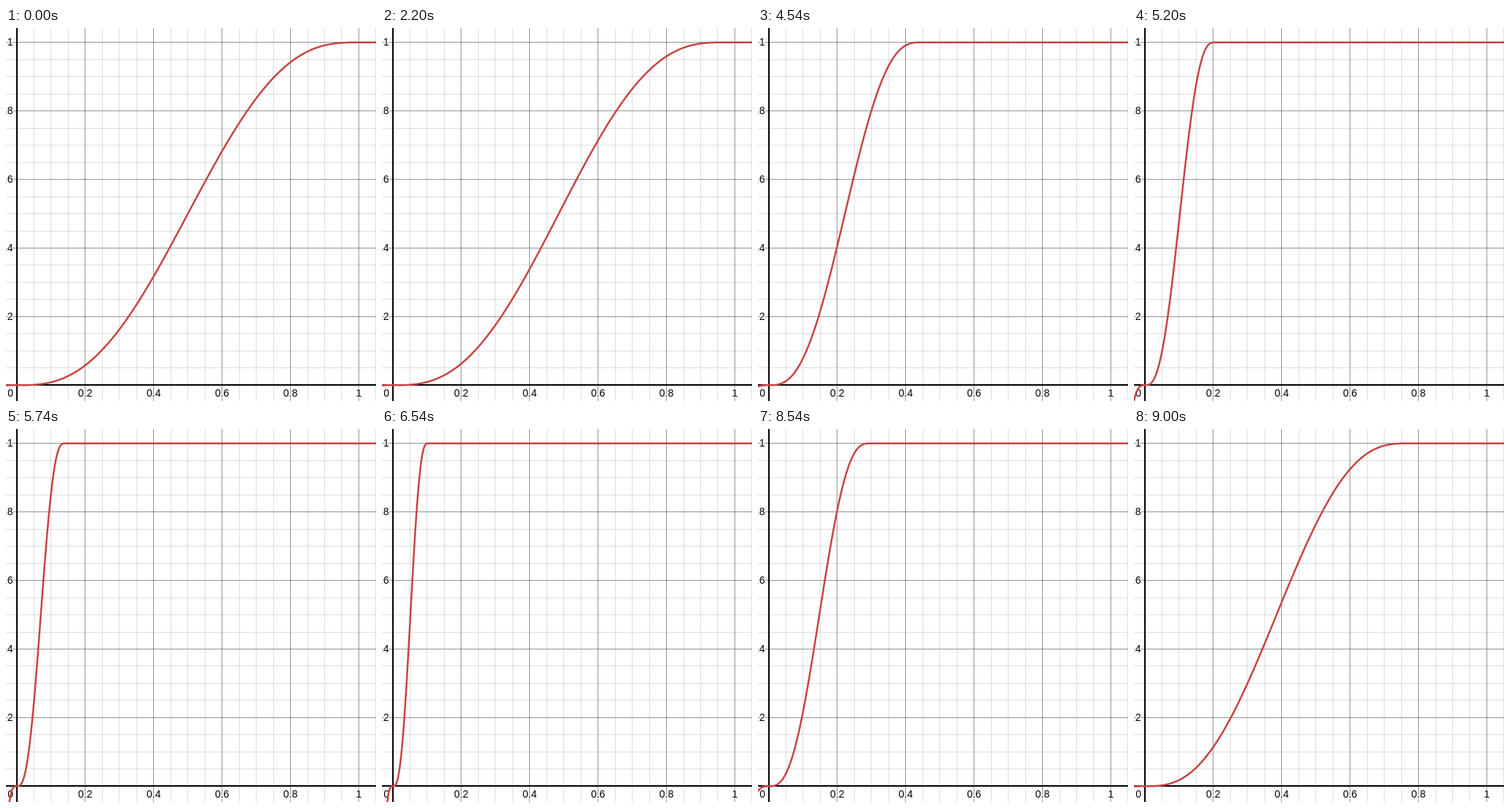
Recreate the animation shown at these times as an HTML page with a canvas. Size 508 by 511 pixels, loop 9070 ms.

```html
<!DOCTYPE html>
<html lang="en">
<head>
<meta charset="utf-8">
<title>Smoother step</title>
<style>
  html, body { margin: 0; width: 100%; height: 100%; overflow: hidden; background: #fff; }
  canvas { display: block; }
</style>
</head>
<body>
<canvas id="graph" width="508" height="511"></canvas>
<script>
const canvas = document.getElementById('graph');
const ctx = canvas.getContext('2d');
const W = canvas.width, H = canvas.height;
const X0 = 14.86, Y0 = 489.34, UNIT = 469.6;
const LOOP = 9070, TICK = 1000 / 15;

// Slider drags: first tick, last tick, width reached
const DRAGS = [
  [32, 37, 0.85], [39, 46, 0.541], [64, 78, 0.205], [79, 87, 0.131],
  [91, 96, 0.103], [110, 122, 0.16], [126, 135, 0.77]
];

const clamp01 = v => Math.min(1, Math.max(0, v));
const toX = x => X0 + x * UNIT;
const toY = y => Y0 - y * UNIT;

function stepWidth(tick) {
  return DRAGS.reduce((width, [from, to, target]) =>
    width + (target - width) * clamp01((tick - from) / (to - from)), 1);
}

function smootherStep(u) {
  return u >= 1 ? 1 : u * u * u * (10 + u * (6 * u - 15));
}

// Full-length vertical and horizontal bars through a point
function cross(x, y, size, color) {
  ctx.fillStyle = color;
  ctx.fillRect(x, 0, size, H);
  ctx.fillRect(0, y, W, size);
}

function drawGrid() {
  for (let k = 1; k <= 21; k++) {
    const color = k % 4 ? 'rgba(0,0,0,.13)' : 'rgba(0,0,0,.42)';
    cross(Math.floor(toX(k / 20)), Math.floor(toY(k / 20)), 1, color);
  }
  cross(Math.round(X0) - 1, Math.round(Y0) - 1, 2, '#000');
}

function label(text, x, y, align) {
  ctx.textAlign = align;
  ctx.strokeText(text, x, y);
  ctx.fillText(text, x, y);
}

function drawLabels() {
  ctx.font = '14px "Liberation Sans", Arial, sans-serif';
  ctx.lineJoin = 'round';
  ctx.lineWidth = 3;
  ctx.strokeStyle = '#fff';
  ctx.fillStyle = '#000';
  label('0', 10, 505, 'right');
  for (let k = 1; k <= 5; k++) {
    label(k / 5, toX(k / 5), 505, 'center');
    label(k / 5, 9.5, toY(k / 5) + 4.5, 'right');
  }
}

function drawCurve(width) {
  ctx.beginPath();
  for (let px = -4; px <= W + 4; px += 0.5) {
    ctx.lineTo(px, toY(smootherStep((px - X0) / UNIT / width)));
  }
  ctx.strokeStyle = '#c74440';
  ctx.lineWidth = 2.5;
  ctx.stroke();
}

const start = performance.now();

function render() {
  const time = (performance.now() - start) % LOOP;
  ctx.clearRect(0, 0, W, H);
  drawGrid();
  drawLabels();
  drawCurve(stepWidth(Math.floor((time + 3) / TICK)));
  requestAnimationFrame(render);
}
render();
</script>
</body>
</html>
```
